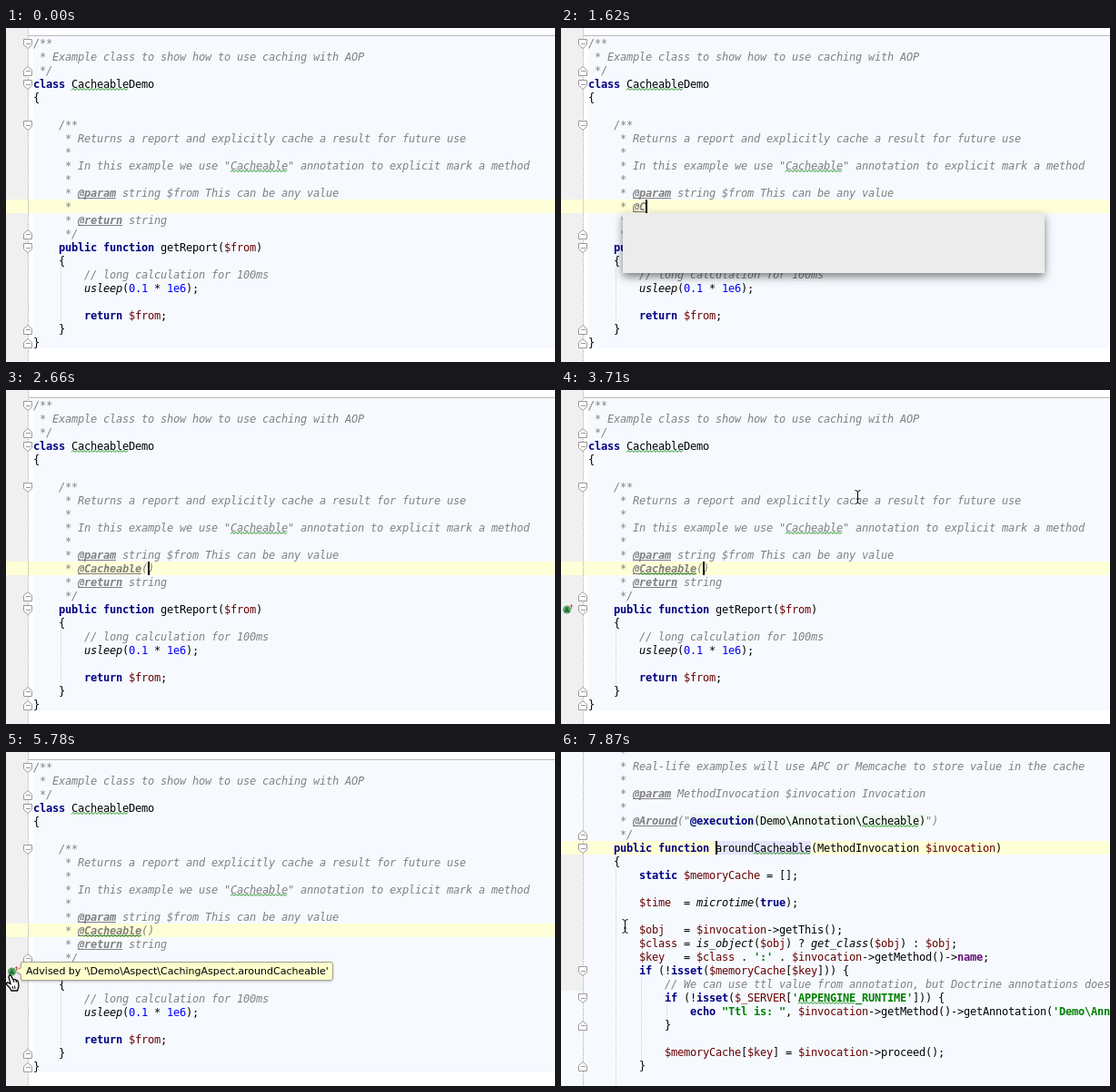
These frames come from a looping animation (604 by 368 pixels, 8 s). An HTML page with a canvas:

```html
<!DOCTYPE html>
<html lang="en">
<head>
<meta charset="utf-8">
<title>Cacheable annotation demo</title>
<style>
  html, body { margin: 0; width: 100%; height: 100%; overflow: hidden; background: #fff; }
  canvas { display: block; }
</style>
</head>
<body>
<canvas id="stage" width="604" height="368"></canvas>
<script>
const ctx = document.getElementById('stage').getContext('2d');
const W = 604, H = 368, LOOP = 8000;
const LEFT = 30, CHAR = 7, ROW = 15;
const MONO = '12px "DejaVu Sans Mono", monospace';
const TINT = '#f6faff', GRAY = '#808080', YELLOW = '#ffffd7';

const demoCode = String.raw`/**
 * Example class to show how to use caching with AOP
 */
class CacheableDemo
{

    /**
     * Returns a report and explicitly cache a result for future use
     *
     * In this example we use "Cacheable" annotation to explicit mark a method
     *
     * @param string $from This can be any value
     * 
     * @return string
     */
    public function getReport($from)
    {
        // long calculation for 100ms
        usleep(0.1 * 1e6);

        return $from;
    }
}`.split('\n');

const aspectCode = String.raw`     *
     * Real-life examples will use APC or Memcache to store value in the cache
     *
     * @param MethodInvocation $invocation Invocation
     *
     * @Around("@execution(Demo\Annotation\Cacheable)")
     */
    public function aroundCacheable(MethodInvocation $invocation)
    {
        static $memoryCache = [];

        $time  = microtime(true);

        $obj   = $invocation->getThis();
        $class = is_object($obj) ? get_class($obj) : $obj;
        $key   = $class . ':' . $invocation->getMethod()->name;
        if (!isset($memoryCache[$key])) {
            // We can use ttl value from annotation, but Doctrine annotations does
            if (!isset($_SERVER['APPENGINE_RUNTIME'])) {
                echo "Ttl is: ", $invocation->getMethod()->getAnnotation('Demo\Annotation\Cacheable');
            }

            $memoryCache[$key] = $invocation->proceed();
        }`.split('\n');

const codeStyles = [
  [/^['"]/, 'bold', '#008000'],
  [/^\$/, '', '#660000'],
  [/^\d/, '', '#0000ff'],
  [/^(class|public|function|return|static|true|if|isset|echo)$/, 'bold', '#000080'],
  [/^(usleep|microtime|is_object|get_class)$/, 'italic', '#000'],
  [/^name$/, 'bold', '#660e7a'],
  [/./, '', '#000'],
];
const commentStyles = [
  [/^@execution/, 'bold', '#000080'],
  [/^(\(?Demo)/, '', '#000'],
  [/^@/, 'italic bold', GRAY, true],
  [/./, 'italic', GRAY],
];
const codeTokens = /'[^']*'|"[^"]*"|\$\w+|\d[\d.]*(e\d+)?|\w+|\s+|[^\w\s$'"]+/g;
const commentTokens = /@execution|\(Demo[\w\\]*\)|@\w*|[^@(]+|\(/g;

const colX = col => LEFT + col * CHAR;
const clamp = v => Math.max(0, Math.min(1, v));
const smooth = p => p * p * (3 - 2 * p);

function rect(x, y, w, h, color) {
  ctx.fillStyle = color;
  ctx.fillRect(x, y, w, h);
}

function stroke(path, color, width = 1) {
  ctx.strokeStyle = color;
  ctx.lineWidth = width;
  ctx.stroke(path);
}

function drawToken(text, x, y, style, color) {
  ctx.font = style + ' ' + MONO;
  ctx.letterSpacing = '0px';
  ctx.letterSpacing = CHAR - ctx.measureText('m').width + 'px';
  ctx.fillStyle = color;
  ctx.fillText(text, x, y);
}

function drawLine(line, top) {
  const isComment = /^\s*(\/\*|\*|\/\/)/.test(line);
  const styles = isComment ? commentStyles : codeStyles;
  for (const { 0: text, index } of line.matchAll(isComment ? commentTokens : codeTokens)) {
    if (!text.trim()) continue;
    const [, style, color, underline] = styles.find(s => s[0].test(text) || s[0].source === '.');
    drawToken(text, colX(index), top + 12, style, color);
    if (underline) rect(colX(index), top + 13, text.length * CHAR, 1, color);
  }
}

function squiggle(col, length, top) {
  const path = new Path2D();
  for (let i = 0; i <= length * CHAR / 2; i++)
    path.lineTo(colX(col) + i * 2, top + (i % 2 ? 12.5 : 14.5));
  stroke(path, '#128a12');
}

function foldMarker(top, opens, color = '#999') {
  const flat = top + (opens ? 3.5 : 13.5), dir = opens ? 1 : -1;
  const path = new Path2D(`M19.5 ${flat}h9v${6 * dir}l-4.5 ${4 * dir}l-4.5 ${-4 * dir}z`);
  ctx.fillStyle = '#fff';
  ctx.fill(path);
  stroke(path, color);
  rect(22, top + 8, 5, 1, color);
}

function dottedLine() {
  for (let y = 0; y < H; y += 2) rect(24, y, 1, 1, '#aaa');
}

function guide(col, y1, y2) {
  for (let y = y1; y < y2; y += 2) rect(colX(col) + 2, y, 1, 1, '#cfcfcf');
}

function caret(x, top) {
  rect(x, top, 2, ROW, '#000');
}

function withShadow(blur, offset, alpha, draw) {
  ctx.save();
  ctx.shadowColor = `rgba(0,0,0,${alpha})`;
  ctx.shadowBlur = blur;
  ctx.shadowOffsetY = offset;
  draw();
  ctx.restore();
}

function drawPopup(filled) {
  withShadow(9, 4, .5, () => rect(68, 204, 464, 66, '#ececec'));
  if (!filled) return;
  rect(68, 204, 464, 17, '#0052a4');
  drawToken('Cacheable', 86, 217, '', '#fff');
}

function drawAdviceIcon() {
  ctx.fillStyle = '#59a869';
  ctx.beginPath();
  ctx.arc(6.5, 242, 4.5, 0, 7);
  ctx.fill();
  stroke(new Path2D('M4.5 245L6.5 239.5L8.5 245M5 243.5H8'), '#174f22');
  stroke(new Path2D('M11.5 241V236.5M9.8 238.5L11.5 236.5L13.2 238.5'), '#d9534f');
}

function drawTooltip() {
  const box = new Path2D('M18 231.5H357Q359.5 231.5 359.5 234V249Q359.5 251.5 357 251.5H18Q16.5 251.5 16.5 249V245L10 241L16.5 238V234Q16.5 231.5 18 231.5Z');
  withShadow(3, 1, .3, () => {
    ctx.fillStyle = '#fefecd';
    ctx.fill(box);
  });
  stroke(box, '#a3a38c');
  ctx.font = '11px "DejaVu Sans", sans-serif';
  ctx.letterSpacing = '0px';
  ctx.fillStyle = '#000';
  ctx.fillText(String.raw`Advised by '\Demo\Aspect\CachingAspect.aroundCacheable'`, 22, 245);
}

const handShape = new Path2D('M-4-6Q-3.5-9-1.5-7.5L1-3Q2.5-4.5 4-2.5Q6-3 6.5 0L7 4Q6.5 6 5.5 9H-1Q-3 5-6 2.5Q-7.5 .5-5 0L-2 1.5Z');
const knuckles = new Path2D('M1-3L2 0M4-2.5L4.5 0M0 4L1 7M2.5 3.5L3 7');
const beamShape = new Path2D('M-3-7.5Q0-7.5 0-5Q0-7.5 3-7.5M0-5V5M-3 7.5Q0 7.5 0 5Q0 7.5 3 7.5M-1.5 2H1.5');

function drawPointer(x, y) {
  ctx.save();
  ctx.translate(Math.round(x), Math.round(y));
  if (x < 24) {
    ctx.fillStyle = '#fff';
    ctx.fill(handShape);
    stroke(handShape, '#000', 1.3);
    stroke(knuckles, '#000');
  } else {
    ctx.translate(.5, 0);
    stroke(beamShape, '#fff', 2.5);
    stroke(beamShape, '#000');
  }
  ctx.restore();
}

function drawDemo(t) {
  const rowTop = n => 9 + n * ROW, lineTop = rowTop(12);
  const typed = t < 600 ? '' : t < 1350 ? '@' : t < 2660 ? '@C' : '@Cacheable()';
  const caretCol = 7 + Math.min(typed.length, 11);
  const caretHidden = [[0, 300], [1200, 1350], [2360, 2660], [3860, 4440], [4880, 5330], [5780, 6380]]
    .some(([from, to]) => t >= from && t < to);

  rect(0, 0, W, H, '#fff');
  rect(0, 0, 24, H, '#f0f0f0');
  rect(LEFT, 9, W - LEFT, 344, TINT);
  rect(LEFT - 5, 8, W, 1, '#b8b8b8');
  rect(0, lineTop, W, ROW, YELLOW);
  dottedLine();
  guide(4, rowTop(17), rowTop(21));

  demoCode.forEach((line, n) => drawLine(n === 12 ? line + typed : line, rowTop(n)));
  squiggle(6, 9, rowTop(3));
  squiggle(31, 9, rowTop(9));
  if (t >= 2960) squiggle(8, 9, lineTop);
  [0, 3, 6, 15].forEach(n => foldMarker(rowTop(n), true));
  [2, 14, 21, 22].forEach(n => foldMarker(rowTop(n), false));

  if (!caretHidden) caret(colX(caretCol), lineTop);
  if (t >= 1620 && t < 2660) drawPopup(t >= 1760);
  if (t >= 3110) drawAdviceIcon();
  if (t >= 5780) drawTooltip();
  if (t >= 3560) {
    const p = smooth(clamp(Math.floor((t - 3560) / 147) / 7));
    drawPointer(345 - 338 * p, 110 + 144 * p);
  }
}

function drawAspect(t) {
  const rowTop = n => -7 + n * ROW, lineTop = rowTop(7);
  const p = clamp(Math.floor((t - 7440) / 143 + 1) / 4);
  const x = 7 + 63 * p, y = 254 - 62 * p;
  const hovering = t >= 6980 && x < 24;

  rect(0, 0, W, H, TINT);
  if (t >= 7130) rect(0, lineTop + ROW, 24, 150, '#f0f0f0');
  rect(0, lineTop, W, ROW, YELLOW);
  rect(colX(16), rowTop(5), 37 * CHAR, ROW, '#edf9ef');
  if (t >= 7720) rect(colX(20), lineTop, 15 * CHAR, ROW, '#e4e4ff');
  dottedLine();
  if (hovering) rect(24, lineTop + ROW, 1, H, '#222');
  guide(4, rowTop(9), H);
  guide(8, rowTop(17), rowTop(23));
  guide(12, rowTop(19), rowTop(20));

  aspectCode.forEach((line, n) => drawLine(line, rowTop(n)));
  if (t >= 6980) {
    squiggle(43, 9, rowTop(5));
    squiggle(26, 9, lineTop);
    squiggle(33, 9, rowTop(18));
  }
  [7, 16, 18].forEach(n => foldMarker(rowTop(n), true, hovering && n === 7 ? '#222' : '#999'));
  [6, 20, 23].forEach(n => foldMarker(rowTop(n), false));

  if (t >= 7130) caret(colX(20), lineTop);
  drawPointer(x, y);
}

function render(now) {
  const t = now % LOOP;
  (t < 6830 ? drawDemo : drawAspect)(t);
  requestAnimationFrame(() => render(performance.now() - start));
}

const start = performance.now();
render(0);
</script>
</body>
</html>
```
